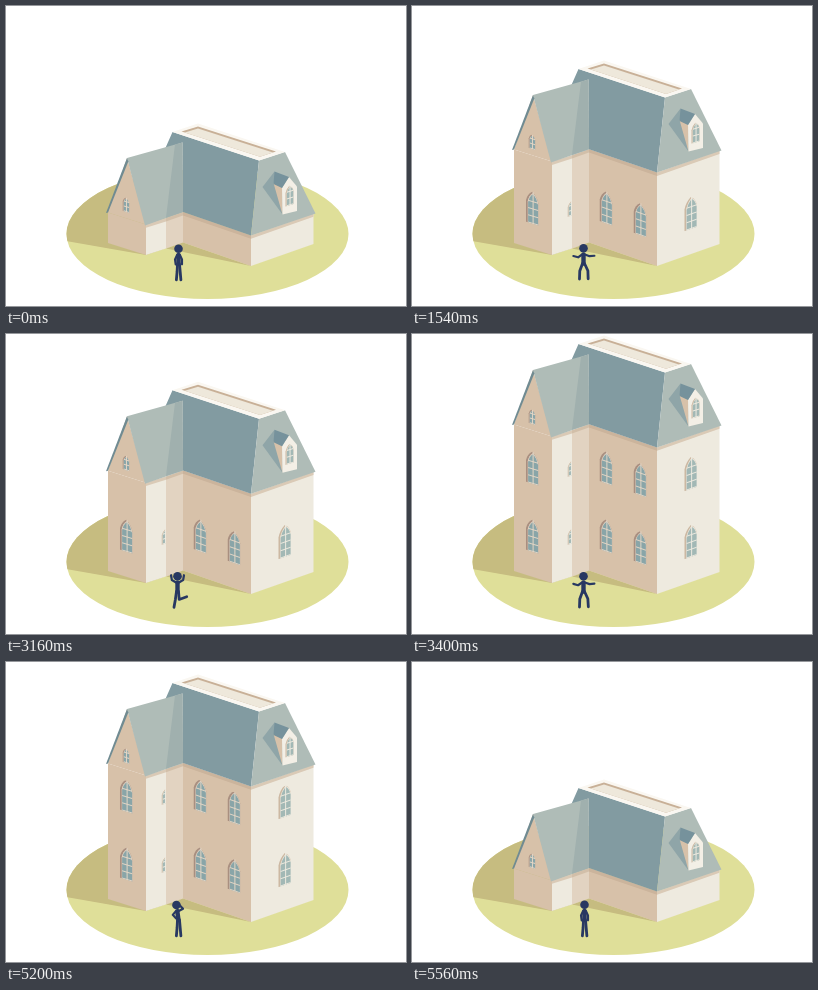
An HTML page with a canvas that plays this animation: 400 by 300 pixels, repeating every 6 s.

```html
<!DOCTYPE html>
<html lang="en">
<head>
<meta charset="utf-8">
<title>Growing house</title>
<style>
html, body { margin: 0; width: 100%; height: 100%; overflow: hidden; background: #fff; }
canvas { display: block; }
</style>
</head>
<body>
<canvas id="stage" width="400" height="300"></canvas>
<script>
const c = document.getElementById('stage').getContext('2d');
const LOOP = 6000, STOREY = 68, LOW_WALL = 30.5;
const LIT = '#eeeadf', SHADE = '#d7c1a9', GRASS = '#dfdf99', SHADOW = '#c6bc80', RIM = '#faf7f1',
  ROOF = '#829ba1', ROOF_LIT = '#afbcb7', ROOF_SHADE = '#a0b0ae', ROOF_DARK = '#76929c', NAVY = '#283862';
const DARK_PANE = { jamb: '#a98f80', bar: '#e4d6c5', glass: '#89a5a8' };
const LIGHT_PANE = { jamb: '#ccb8a2', bar: LIT, glass: '#a2b8b5' };

const clamp = u => Math.max(0, Math.min(1, u));
const mix = (a, b, u) => a + (b - a) * u;
const between = (p, q, u) => p.map((v, i) => mix(v, q[i], u));
const smooth = u => u * u * (3 - 2 * u);
const cubic = u => u < .5 ? 4 * u ** 3 : 1 - 4 * (1 - u) ** 3;
const easeOut = u => 1 - (1 - u) ** 2;
const span = (t, a, b) => clamp((t - a) / (b - a));
const raise = ([x, y], h) => [x, y - h];

function poly(color, ...points) {
  c.fillStyle = color;
  c.beginPath();
  points.forEach(p => c.lineTo(...p));
  c.fill();
}

// Foot of each wall corner, from left to right.
const [A, B, C, D, E, F] = [[102, 237], [140, 249], [160, 242.6], [177, 236.6], [245, 260], [307.5, 238]];
const GABLE = [121, 152], RIDGE = [176.5, 136.5];
const TOP = [[166.5, 126], [192, 117.5], [279, 146], [253, 154.5]];
const WELL = [[175.5, 125.5], [192, 120.5], [270, 145.5], [254, 150.8]];

const big = { w: 12.5, h: 32, rows: 4, sill: 25, hidden: 6 };
const small = { w: 6.5, h: 14.5, rows: 3, sill: 33, hidden: 12 };
const walls = [
  { from: A, to: B, color: SHADE, paint: DARK_PANE, type: big, at: [.48] },
  { from: B, to: C, color: LIT, eave: '#dacab6', paint: LIGHT_PANE, type: small, at: [.95] },
  { from: C, to: D, color: '#e2d3c1', eave: '#d2bfa9', at: [] },
  { from: D, to: E, color: SHADE, eave: '#cbb49c', paint: DARK_PANE, type: big, at: [.25, .75] },
  { from: E, to: F, color: LIT, eave: '#dacab6', paint: LIGHT_PANE, type: big, at: [.54] }
];

// Height gained by the walls: two lifts with overshoot, then a drop.
function lift(t) {
  const rise = (t, from, peak, rest) => t < 410
    ? mix(from, peak, cubic(clamp(t / 410)))
    : mix(peak, rest, easeOut(span(t, 410, 590)));
  if (t < 2300) return rise(t - 1065, 0, 68, 59.5);
  if (t < 5160) return rise(t - 3015, 59.5, 116, 112);
  const u = span(t, 5160, 5560);
  return 112 * (1 - mix(smooth(u), u, .45));
}

function arch(w, h) {
  c.beginPath();
  c.moveTo(-w / 2, 0);
  c.lineTo(-w / 2, -h * .68);
  c.quadraticCurveTo(-w * .4, -h * .88, 0, -h);
  c.quadraticCurveTo(w * .4, -h * .88, w / 2, -h * .68);
  c.lineTo(w / 2, 0);
  c.fill();
}

// x, y is the middle of the sill; only the lowest `shown` pixels are visible.
function pane([x, y], { w, h, rows }, slope, paint, shown = h) {
  if (shown <= 0) return;
  c.save();
  c.transform(1, slope, 0, 1, x, y);
  c.beginPath();
  c.rect(-w, -shown, 2 * w, shown);
  c.clip();
  c.fillStyle = paint.jamb;
  arch(w, h);
  c.translate(w * .07, 0);
  c.fillStyle = paint.bar;
  arch(w * .86, h * .97);
  c.fillStyle = paint.glass;
  arch(w * .8, h * .94);
  c.fillStyle = paint.bar;
  c.fillRect(-.5, -h, 1, h);
  for (let i = 0; i < rows; i++) c.fillRect(-w * .4, -h * .68 * i / (rows - 1) - 1, w * .8, 1);
  c.restore();
}

function ground() {
  c.save();
  c.fillStyle = GRASS;
  c.beginPath();
  c.ellipse(201.5, 228, 141, 65, 0, 0, 7);
  c.fill();
  c.clip();
  poly(SHADOW, [55, 234], B, D, raise(D, 90), [55, 150]);
  poly(SHADOW, C, D, E);
  c.restore();
}

function house(o) {
  const eave = LOW_WALL + o;
  poly(SHADE, raise(A, eave), raise(GABLE, o), raise(B, eave));
  for (const { from, to, color, eave: strip, paint, type, at } of walls) {
    const slope = (to[1] - from[1]) / (to[0] - from[0]);
    poly(color, from, to, raise(to, eave), raise(from, eave));
    if (strip) poly(strip, raise(from, eave), raise(to, eave), raise(to, eave - 3.3), raise(from, eave - 3.3));
    for (const u of at) for (const up of [0, STOREY])
      pane(raise(between(from, to, u), type.sill + up), type, slope, paint, o - up - type.hidden);
  }
  c.save();
  c.translate(0, -o);
  roof();
  dormer();
  c.restore();
}

function roof() {
  const [a, b, d, e, f] = [A, B, D, E, F].map(p => raise(p, LOW_WALL));
  poly(ROOF, TOP[0], TOP[3], e, d, RIDGE, [159, 143]);
  poly(ROOF_LIT, TOP[3], TOP[2], [f[0] + 2, f[1]], e);
  poly(RIM, ...TOP);
  c.save();
  poly('#c8b097', ...WELL);
  c.clip();
  c.translate(0, 2);
  poly('#eee8db', ...WELL);
  c.restore();

  poly(ROOF_LIT, GABLE, RIDGE, d, [b[0] - 1, b[1] + 1]);
  poly(ROOF_SHADE, between(GABLE, RIDGE, .865), RIDGE, d, between(b, d, .54));
  poly('#708b92', GABLE, [122.3, 155.5], a, [a[0] - 2, a[1] + .5]);
  pane([120, 206], small, .32, DARK_PANE);
}

function dormer() {
  const back = [268.5, 165.5], peak = [283, 171], left = [276, 182], foot = [276.5, 208.5];
  poly('#8fa5a8', back, [256.5, 181], foot);
  poly(SHADE, [267.5, 177], left, foot);
  poly('#f3efe6', peak, [291, 180.5], [291, 205], foot, left);
  poly(ROOF_DARK, back, peak, left, [267.5, 178]);
  pane([283.5, 199.5], { w: 8, h: 20, rows: 3 }, -.3, LIGHT_PANE);
}

// Limb angles in degrees: 0 hangs down, positive swings right. Pairs are upper and lower part.
const stand = { hip: [172.5, 258], lean: [0], armL: [-25, 8], armR: [25, 0], legL: [-3, -5], legR: [5, 5] };
const crouch = { hip: [171, 264], lean: [25], armL: [45, 30], armR: [60, 30], legL: [45, -48], legR: [52, -28] };
const cheer = { hip: [172.5, 258.5], lean: [0], armL: [-115, -155], armR: [115, 150], legL: [-20, -2], legR: [25, 2] };
const wide = { ...cheer, hip: [171.5, 257.5], armL: [-55, -105], armR: [70, 95] };
const kick = { ...wide, armL: [-120, -170], armR: [120, 170], legL: [-8, -10], legR: [5, 110] };
const think = { ...stand, lean: [-8], armL: [-40, 45], armR: [120, 230] };

const keys = [
  [0, stand], [280, stand], [660, crouch], [1020, crouch], [1220, cheer], [1540, wide], [1740, stand],
  [2120, stand], [2500, crouch], [2960, crouch], [3160, kick], [3420, wide], [3600, stand],
  [3620, stand], [4000, think], [5160, think], [5560, stand], [LOOP, stand]
];

function step([x, y], angle, length) {
  const r = angle * Math.PI / 180;
  return [x + Math.sin(r) * length, y + Math.cos(r) * length];
}

function stroke(width, ...points) {
  c.lineWidth = width;
  c.beginPath();
  points.forEach(p => c.lineTo(...p));
  c.stroke();
}

function limb(width, [x, y], side, [upper, lower], length) {
  const root = [x + side, y], joint = step(root, upper, length);
  stroke(width, root, joint, step(joint, lower, length));
}

function person(t) {
  const i = keys.findIndex(k => k[0] > t), [t0, a] = keys[i - 1], [t1, b] = keys[i];
  const u = smooth(span(t, t0, t1)), p = {};
  for (const part in a) p[part] = between(a[part], b[part], u);
  const up = 180 - p.lean[0], neck = step(p.hip, up, 9);
  c.strokeStyle = c.fillStyle = NAVY;
  c.lineCap = c.lineJoin = 'round';
  c.beginPath();
  c.arc(...step(neck, up, 6.2), 4.3, 0, 7);
  c.fill();
  stroke(4.4, neck, p.hip);
  limb(2.2, neck, -1.4, p.armL, 4.9);
  limb(2.2, neck, 1.4, p.armR, 4.9);
  limb(2.8, p.hip, -1, p.legL, 8);
  limb(2.8, p.hip, 1, p.legR, 8);
}

function draw(now) {
  const t = now % LOOP;
  c.clearRect(0, 0, 400, 300);
  ground();
  house(lift(t));
  person(t);
}

const start = performance.now();
(function tick() {
  draw(performance.now() - start);
  requestAnimationFrame(tick);
})();
</script>
</body>
</html>
```
